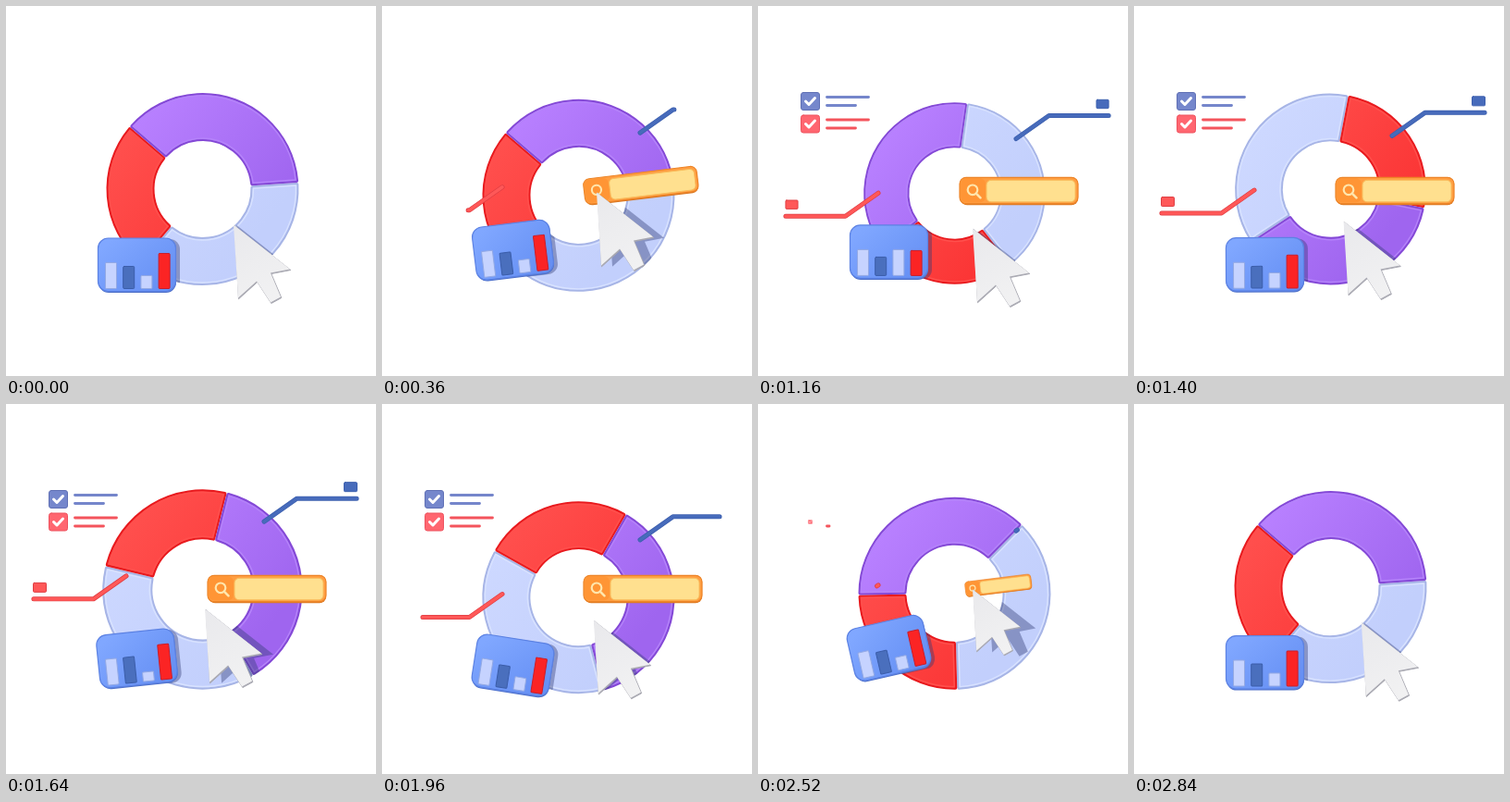
Recreate the animation shown at these times as an HTML page with a canvas. Size 400 by 400 pixels, loop 2880 ms.

```html
<!DOCTYPE html>
<html lang="en">
<head>
<meta charset="utf-8">
<title>Chart dashboard loop</title>
<style>
html, body { margin: 0; width: 100%; height: 100%; overflow: hidden; background: #fff; }
canvas { display: block; width: 100vw; height: 100vh; }
</style>
</head>
<body>
<canvas id="stage" width="400" height="400"></canvas>
<script>
const ctx = document.getElementById('stage').getContext('2d');
const LOOP = 2880;
const TAU = Math.PI * 2;
const rad = degrees => degrees * Math.PI / 180;

// Smooth ramp from 0 to 1 between two times
function ramp(t, from, to) {
  const x = Math.min(1, Math.max(0, (t - from) / (to - from)));
  return x * x * (3 - 2 * x);
}
const during = (t, in0, in1, out0, out1) => ramp(t, in0, in1) - ramp(t, out0, out1);

// Smooth bump of height 1 around a moment
function bump(t, center, halfWidth) {
  const x = Math.abs(t - center) / halfWidth;
  return x < 1 ? Math.cos(x * Math.PI / 2) ** 2 : 0;
}

// Every part reacts to the same few gestures
function poseAt(t) {
  const open = bump(t, 360, 360), close = bump(t, 2520, 340);
  const press = bump(t, 1160, 350), rebound = bump(t, 1640, 320);
  const reach = bump(t, 1660, 420);
  return {
    ring: {
      y: 204.8 - 6.8 * Math.cos(TAU * t / 1440),
      angle: -300 * during(t, 895, 1692, 1820, 2735),
      scale: 1 - 0.055 * press + 0.04 * rebound
    },
    card: {
      y: 272 + 8 * Math.cos(TAU * t / 720) + 12 * during(t, 1450, 1900, 1960, 2450),
      tilt: -7 * open - 13 * close - 6 * bump(t, 1620, 250) + 9 * bump(t, 1980, 250),
      bars: [28, 24 - 4 * press + 4 * rebound, 14 + 14 * press - 4 * rebound, 38 - 11 * press]
    },
    cursor: {
      x: 246 - 14 * during(t, 0, 330, 2600, 2860) - 17 * reach,
      y: 236.5 - 35 * open + 4 * press - 15 * reach - 36 * close,
      scale: 1 - 0.16 * bump(t, 2520, 180),
      lift: 3 + 9 * open + 10 * reach + 14 * close
    }
  };
}

function placed(x, y, angle, scale, draw) {
  ctx.save();
  ctx.translate(x, y);
  ctx.rotate(rad(angle));
  ctx.scale(scale, scale);
  draw();
  ctx.restore();
}

function box(x, y, w, h, r, fill, edge, edgeWidth = 1) {
  ctx.beginPath();
  ctx.roundRect(x, y, w, h, r);
  ctx.fillStyle = fill;
  ctx.fill();
  if (edge) {
    ctx.strokeStyle = edge;
    ctx.lineWidth = edgeWidth;
    ctx.stroke();
  }
}

function line(points, color, width) {
  ctx.beginPath();
  points.forEach(([x, y]) => ctx.lineTo(x, y));
  ctx.strokeStyle = color;
  ctx.lineWidth = width;
  ctx.stroke();
}

function gradient(x0, y0, x1, y1, from, to) {
  const g = ctx.createLinearGradient(x0, y0, x1, y1);
  g.addColorStop(0, from);
  g.addColorStop(1, to);
  return g;
}

// Ring slice; inset pulls every side inwards by the same distance
function slicePath(start, end, inset) {
  const outer = 104 - inset, inner = 52 + inset;
  ctx.beginPath();
  ctx.arc(0, 0, outer, start + inset / outer, end - inset / outer);
  ctx.arc(0, 0, inner, end - inset / inner, start + inset / inner, true);
  ctx.closePath();
}

function drawRing({ y, angle, scale }) {
  const slices = [
    { from: -4, to: 130, light: '#cdd8ff', base: '#c2cffc', edge: '#a7b5e6', bevel: '#d8e2ff' },
    { from: 130, to: 220.6, light: '#ff4f4d', base: '#fb3535', edge: '#e81a1e', bevel: '#ff504d' },
    { from: 220.6, to: 356, light: '#b880ff', base: '#9f65ef', edge: '#8449d6', bevel: '#b583fa' }
  ];
  placed(212.5, y, 0, scale, () => {
    for (const { from, to, light, base, edge, bevel } of slices) {
      const start = rad(from + angle), end = rad(to + angle);
      slicePath(start, end, 2);
      ctx.strokeStyle = edge;
      ctx.lineWidth = 4;
      ctx.stroke();
      ctx.fillStyle = gradient(-80, -60, 60, 50, light, base);
      ctx.fill();
      slicePath(start, end, 3);
      ctx.strokeStyle = bevel;
      ctx.lineWidth = 1.4;
      ctx.stroke();
    }
  });
}

function arrowPath() {
  const points = [[0, 0], [61, 48], [40, 52], [51, 78], [40, 84], [25, 61], [5, 79]];
  ctx.beginPath();
  points.forEach(([x, y]) => ctx.lineTo(x, y));
  ctx.closePath();
}

// Shadows fall only on the ring
function drawShadows({ cursor, card }) {
  ctx.save();
  ctx.globalCompositeOperation = 'source-atop';
  ctx.fillStyle = 'rgba(48,58,115,.4)';
  placed(cursor.x + cursor.lift, cursor.y + cursor.lift * 0.1, 0, cursor.scale, () => {
    arrowPath();
    ctx.fill();
  });
  placed(146, card.y + 1, card.tilt, 1, () => {
    ctx.beginPath();
    ctx.roundRect(-42, -29, 84, 58, 11);
    ctx.fill();
  });
  ctx.restore();
}

function drawCallout(t, nodeX, nodeY, side, rise, color, dark) {
  const y = nodeY - 10 * Math.sin(TAU * t / 720);
  const elbowX = nodeX + side * 35.5, endX = elbowX + side * 65;
  const length = 108 * during(t, 20, 790, 1780, 2580);
  if (length > 0.3) {
    const points = [[nodeX, y], [elbowX, y + rise], [endX, y + rise]];
    ctx.setLineDash([length, 300]);
    line(points, dark, 5);
    line(points, color, 3.6);
    ctx.setLineDash([]);
  }
  const size = during(t, 720, 1240, 1700, 1920);
  if (size > 0.02) {
    placed(endX - side * 7, y + rise - 12.5, 0, size, () => box(-7, -5, 14, 10, 1, color, dark));
  }
}

function drawCheckRow(t, y, delay, color, edge, lineColor) {
  const start = t - delay;
  const size = during(start, 600, 900, 2100, 2500);
  if (size > 0.02) {
    placed(56.5, y, 0, size, () => {
      box(-10, -9.5, 20, 19, 2.5, color, edge);
      line([[-5, 0], [-1.5, 3.5], [5, -3.5]], '#fff', 3);
    });
  }
  for (const i of [0, 1]) {
    const width = (45 - 14 * i) * during(start - 60 * i, 640, 950, 2000, 2390);
    const lineY = y - 4.5 + 9 * i;
    if (width > 0.3) line([[74.5, lineY], [74.5 + width, lineY]], lineColor, 2.8);
  }
}

function drawCard({ y, tilt, bars }) {
  const pale = ['#c6d3ff', '#93a9e4'], navy = ['#4a6fbd', '#3b5da9'], red = ['#fb2424', '#c91e2b'];
  const colors = [pale, navy, pale, red];
  placed(141.5, y, tilt, 1, () => {
    box(-41.5, -28, 84, 58, 11, '#4e70c8');
    box(-42, -29, 84, 57.5, 11, gradient(-25, -29, 25, 29, '#80a7ff', '#6690f4'), '#5c82e3', 1.2);
    bars.forEach((height, i) => box(-34 + i * 19.2, 25.5 - height, 12, height, 1, ...colors[i]));
  });
}

function drawSearch(t) {
  const size = during(t, 60, 400, 2360, 2710);
  if (size < 0.02) return;
  const tilt = -14 * (1 - during(t, 200, 520, 2340, 2700));
  placed(232, 199.3, tilt, size, () => {
    box(-13, -13, 127, 29, 7, '#d77621');
    box(-14, -14, 128, 28.5, 7, '#ff9e42', '#ed8427', 1.2);
    box(-13, -13, 27, 26, 6, '#ff9535');
    box(15, -11, 96, 23.5, 5, '#ffe08f', '#f8bd5c');
    ctx.beginPath();
    ctx.arc(0, -0.5, 5.3, 0, TAU);
    ctx.strokeStyle = '#ffe6ad';
    ctx.lineWidth = 2.2;
    ctx.stroke();
    const handle = 4.5 * during(t, 380, 600, 2250, 2430);
    if (handle > 0.1) line([[4, 3.5], [4 + handle, 3.5 + handle]], '#ffe6ad', 2.6);
  });
}

function drawCursor({ x, y, scale }) {
  placed(x, y, 0, scale, () => {
    ctx.save();
    ctx.translate(0.8, 1);
    arrowPath();
    ctx.fillStyle = ctx.strokeStyle = '#a9a9b2';
    ctx.lineWidth = 1;
    ctx.fill();
    ctx.stroke();
    ctx.restore();
    arrowPath();
    ctx.fillStyle = gradient(0, 0, 40, 80, '#e9e9ec', '#f1f1f2');
    ctx.fill();
  });
}

function render(t) {
  const pose = poseAt(t);
  ctx.clearRect(0, 0, 400, 400);
  ctx.lineCap = ctx.lineJoin = 'round';
  drawRing(pose.ring);
  drawShadows(pose);
  drawCallout(t, 279, 137, 1, -25, '#476bbb', '#3c5fae');
  drawCallout(t, 130, 195.7, -1, 25, '#ff5858', '#de3c42');
  drawCheckRow(t, 103, 0, '#7587cc', '#6070b5', '#7586cb');
  drawCheckRow(t, 127.5, 140, '#ff6670', '#ee535f', '#f4545c');
  drawCard(pose.card);
  drawSearch(t);
  drawCursor(pose.cursor);
}

const began = performance.now();
function tick() {
  render((performance.now() - began) % LOOP);
  requestAnimationFrame(tick);
}
tick();
</script>
</body>
</html>
```
